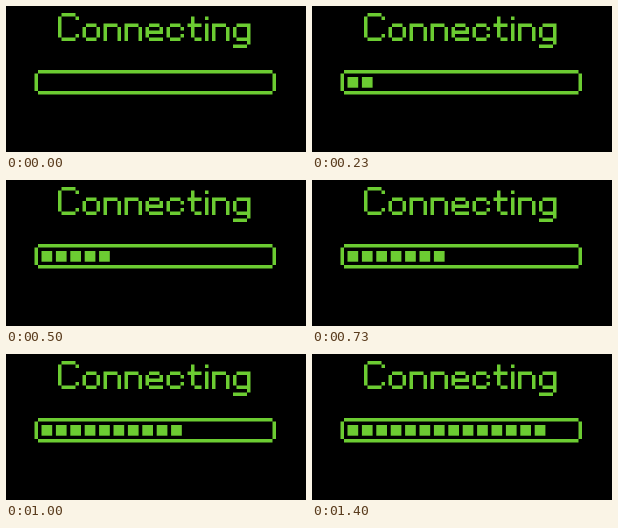
An HTML page for the animation above (1.51 s loop, 300 by 146 pixels).

```html
<!DOCTYPE html>
<html lang="en">
<head>
<meta charset="utf-8">
<title>Connecting</title>
<style>
  html, body { margin: 0; width: 100%; height: 100%; overflow: hidden; background: #000; }
  svg { display: block; width: 300px; height: 146px; }
</style>
</head>
<body>
<svg viewBox="0 0 300 146" fill="#6ccc32" role="img" aria-label="Connecting">
  <g id="title" fill="none" stroke="#6ccc32" stroke-linecap="square"
     transform="translate(53.75 8.75) scale(3.5)"></g>
  <path d="M32 64H266.5V67.5H32zM32 85H266.5V88.5H32zM28.5 67.5H32V85H28.5zM266.5 67.5H270V85H266.5z"/>
  <g id="blocks"></g>
</svg>
<script>
const LOOP = 1510, STEP = 100, COUNT = 14;

// Pixel lettering: [width in cells, strokes through cell centres]
const glyphs = {
  C: [6, 'M1 0h3M5 1h0M0 1v5M1 7h3M5 6h0'],
  o: [5, 'M1 3h2M0 4v2M4 4v2M1 7h2'],
  n: [5, 'M0 3v4M0 3h3M4 4v3'],
  e: [5, 'M1 3h2M0 4v2M4 4v1M0 5h4M1 7h3'],
  c: [5, 'M1 3h2M4 4h0M0 4v2M1 7h2M4 6h0'],
  t: [4, 'M1 1v5M0 3h3M2 7h1'],
  i: [1, 'M0 1h0M0 3v4'],
  g: [5, 'M1 3h3M0 4v2M1 7h3M4 3v5M0 9h3']
};

function add(parent, tag, attrs) {
  const el = document.createElementNS('http://www.w3.org/2000/svg', tag);
  for (const name in attrs) el.setAttribute(name, attrs[name]);
  return parent.appendChild(el);
}

let column = 0;
for (const letter of 'Connecting') {
  const [width, d] = glyphs[letter];
  add(document.getElementById('title'), 'path', { d, transform: `translate(${column})` });
  column += width + 1;
}

const group = document.getElementById('blocks');
const blocks = Array.from({ length: COUNT }, (_, i) =>
  add(group, 'rect', { x: 35.5 + 14.4 * i, y: 71, width: 10.7, height: 10.7 }));

const start = performance.now();
function draw() {
  const filled = Math.floor((performance.now() - start) % LOOP / STEP);
  blocks.forEach((block, i) => block.setAttribute('visibility', i < filled ? 'visible' : 'hidden'));
  requestAnimationFrame(draw);
}
draw();
</script>
</body>
</html>
```
